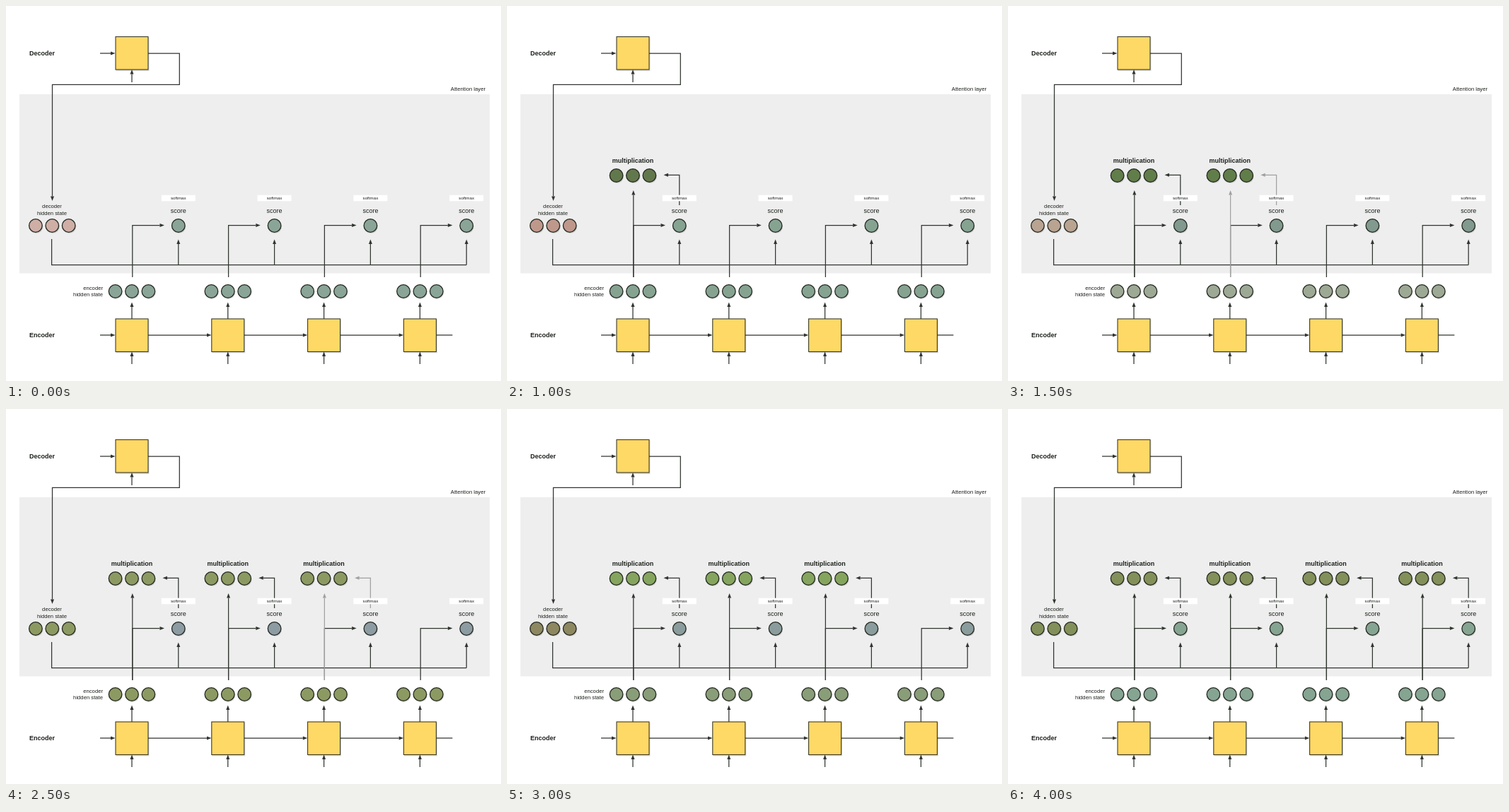
Animation of 700x531 px, one loop 5000 ms. Source, as an HTML page:

```html
<!DOCTYPE html>
<html lang="en">
<head>
<meta charset="utf-8">
<title>Attention layer</title>
<style>
  html, body { margin: 0; height: 100%; overflow: hidden; background: #fff; }
  svg { display: block; font-family: "Liberation Sans", Arial, sans-serif; fill: #1c211b; }
  path { fill: none; stroke: #30352f; stroke-width: 1.25; }
  .head { fill: #30352f; stroke: none; }
  circle { stroke: #252a22; stroke-width: 1.3; }
  .cell { fill: #ffd966; stroke: #3c3a25; stroke-width: 1.1; }
  .shadow { fill: #000; opacity: .14; stroke: none; }
  .mult path { stroke: var(--line); }
  .mult .head { fill: var(--line); stroke: none; }
  .label { font-weight: bold; font-size: 9px; }
  .state { font-size: 7.7px; }
</style>
</head>
<body>
<svg id="stage" width="700" height="531" viewBox="0 0 700 531"></svg>
<script>
const stage = document.getElementById('stage');
const STEP = 500, LOOP = 5000, COLUMN = 135.8;

// Fill colours per step: decoder state, encoder state, score, multiplication
const palettes = [
  ['#cfaea6', '#8aa598', '#8aa598', '#62784c'],
  ['#c7a399', '#88a495', '#88a495', '#62784c'],
  ['#bf988c', '#86a392', '#86a392', '#62784c'],
  ['#b9a391', '#9da994', '#81998e', '#617d49'],
  ['#b3ae96', '#b3ae96', '#7b8e89', '#5f8246'],
  ['#8c9a62', '#8c9a62', '#8d9ba3', '#8c9a62'],
  ['#8e8861', '#899d79', '#8a9c9c', '#85a55e'],
  ['#8f7560', '#86a090', '#869d94', '#7eb05a'],
  ['#83905a', '#86a492', '#86a492', '#83905a']
];
const vars = ['--decoder', '--encoder', '--score', '--mult'];

const text = (s, x, y, cls, anchor = 'start', size = '') =>
  `<text x="${x}" y="${y}" class="${cls}" text-anchor="${anchor}"${size && ` font-size="${size}"`}>${s}</text>`;

const line = (...p) => `<path d="M${p.join(' ')}"/>`;

// Polyline whose last point is the tip of an arrowhead
function arrow(...p) {
  const [x0, y0, x, y] = p.slice(-4);
  const dx = Math.sign(x - x0), dy = Math.sign(y - y0);
  const bx = x - dx * 6.5, by = y - dy * 6.5;
  return line(...p.slice(0, -2), bx, by) +
    `<path class="head" d="M${x} ${y}L${bx + dy * 2.5} ${by + dx * 2.5}L${bx - dy * 2.5} ${by - dx * 2.5}Z"/>`;
}

const dot = (x, y, kind) =>
  `<circle class="shadow" cx="${x + .7}" cy="${y + 1.2}" r="9.8"/>` +
  `<circle cx="${x}" cy="${y}" r="9.3" style="fill:var(--${kind})"/>`;

const triple = (x, y, kind) => [-23.4, 0, 23.4].map(d => dot(x + d, y, kind)).join('');

const cell = (x, y) =>
  `<rect class="shadow" x="${x - 22.5}" y="${y - 22}" width="47" height="47.5"/>` +
  `<rect class="cell" x="${x - 23}" y="${y - 23}" width="46" height="46.5"/>`;

function column(i) {
  const x = 178 + COLUMN * i, up = x + .8, score = 243.8 + COLUMN * i;
  return arrow(up, 384, up, 310.5, x + 46, 310.5) +
    arrow(score, 366.5, score, 330.5) +
    arrow(x, 507, x, 489.5) + arrow(x, 443, x, 419.5) +
    (i < 3 ? arrow(x + 23, 466, x + 112.5, 466) : line(x + 23, 466, x + 46, 466)) +
    cell(x, 466) + triple(x, 404, 'encoder') + dot(score, 311, 'score') +
    text('score', score, 292.8, '', 'middle', 9) +
    `<g class="mult">${arrow(up, 384, up, 261)}${arrow(score, 282, score, 239.3, x + 43.5, 239.3)}` +
    triple(x, 240, 'mult') + text('multiplication', x, 222.3, 'label', 'middle') + '</g>' +
    `<rect x="${score - 24}" y="267.7" width="48" height="8.6" fill="#fff"/>` +
    text('softmax', score, 274, '', 'middle', 6.2);
}

stage.innerHTML =
  '<rect x="19" y="125" width="665" height="253.5" fill="#eee"/>' +
  text('Attention layer', 678, 119.7, 'state', 'end') +
  text('Decoder', 33, 70.2, 'label') + text('Encoder', 33, 469.3, 'label') +
  text('decoder', 65, 286, 'state', 'middle') + text('hidden state', 65, 295.5, 'state', 'middle') +
  text('encoder', 137, 402, 'state', 'end') + text('hidden state', 137, 411, 'state', 'end') +
  arrow(133, 67, 154.5, 67) + arrow(178, 108, 178, 90) +
  arrow(201, 67, 245.3, 67, 245.3, 111.3, 65.5, 111.3, 65.5, 276) +
  cell(178, 66.5) + triple(65.3, 311, 'decoder') +
  line(64.6, 330, 64.6, 366.5, 243.8 + COLUMN * 3, 366.5) +
  arrow(133, 466, 154.5, 466) +
  [0, 1, 2, 3].map(column).join('');

const mults = [...document.querySelectorAll('.mult')];

// Each column appears with pale arrows, then they darken one step later
function show(step) {
  palettes[step].forEach((c, i) => stage.style.setProperty(vars[i], c));
  mults.forEach((g, i) => {
    const first = 2 * i + 1;
    g.style.display = step < first ? 'none' : '';
    g.style.setProperty('--line', step > first ? '#30352f' : i < 3 ? '#a0a0a0' : '#8fa39b');
  });
}

const start = performance.now();
let current = -1;
function tick() {
  const t = (performance.now() - start) % LOOP;
  const step = Math.min(8, Math.floor(t / STEP));
  if (step !== current) show(current = step);
  requestAnimationFrame(tick);
}
tick();
</script>
</body>
</html>
```
